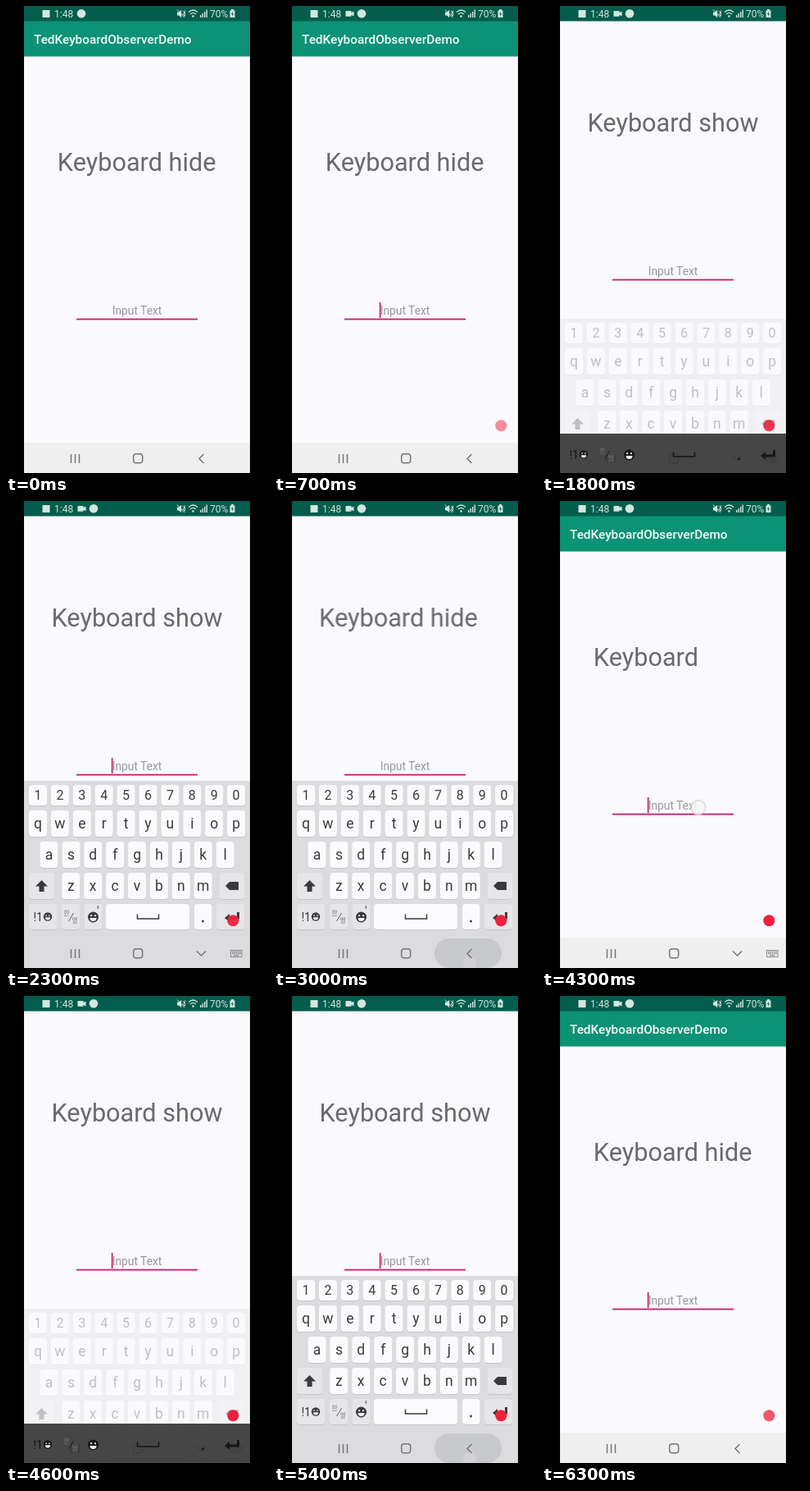
An HTML page that plays this animation: 320x569 px, repeating every 6400 ms.

```html
<!DOCTYPE html>
<html lang="en">
<head>
<meta charset="utf-8">
<title>Keyboard observer demo</title>
<style>
html, body { margin: 0; height: 100%; overflow: hidden; background: #000; }
svg { display: block; width: 100vw; height: 100vh; font-family: Roboto, sans-serif; }
.mid { text-anchor: middle; }
.line { fill: none; stroke: currentColor; }
.big { font-size: 30.67px; fill: #6b696d; white-space: pre; }
.status { color: #d3e6e0; fill: #d3e6e0; }
.nav { color: #757577; }
.keys { color: #3a3a3c; fill: #3a3a3c; }

/* One step is 100 ms, 1.5625% of the loop. */
.a { animation: 6400ms step-end infinite; }
#page { animation-name: pan; }
#hide { animation-name: hide; }
#hideWord { animation-name: word; }
#show { animation-name: show; }
#caret { animation-name: caret; }
#board { animation-name: board; }
#scrim { animation-name: scrim; }
#back { animation-name: back; }
#ime { animation-name: ime; }
#ripple { animation-name: ripple; }
#tapField { animation-name: tapField; }
#tapBack { animation-name: tapBack; }
#camera { animation-name: camera; }
#badge { animation-name: badge; }
#dot { animation-name: dot; animation-timing-function: linear; }

@keyframes pan {
  0%, 53.12%, 92.18%, 100% { transform: translateY(0); }
  24.99%, 68.74% { transform: translateY(-16px); }
  26.56%, 70.31% { transform: translateY(-40px); }
  28.12%, 71.87% { transform: translateY(-48px); }
  49.99%, 89.06% { transform: translateY(-30px); }
  51.56%, 90.62% { transform: translateY(-8px); }
}
@keyframes hide {
  0%, 48.43%, 87.49%, 100% { opacity: 1; transform: translateX(0); }
  24.99%, 68.74% { opacity: 0; transform: translateX(0); }
  46.87%, 85.93% { opacity: 1; transform: translateX(-7.7px); }
}
@keyframes word {
  0%, 24.99%, 68.74%, 100% { visibility: visible; }
  23.43%, 67.18% { visibility: hidden; }
}
@keyframes show {
  0%, 46.87%, 85.93%, 100% { opacity: 0; }
  24.99%, 68.74% { opacity: 1; }
}
@keyframes caret {
  0%, 12.49%, 28.12%, 43.74%, 59.37%, 74.99%, 90.62% { opacity: 0; }
  4.68%, 20.31%, 35.93%, 51.56%, 67.18%, 82.81%, 98.43%, 100% { opacity: 1; }
}
@keyframes board {
  0%, 49.99%, 89.06%, 100% { opacity: 0; transform: translateY(70px); }
  26.56%, 70.31% { opacity: .08; transform: translateY(62px); }
  28.12%, 71.87% { opacity: .3; transform: translateY(40px); }
  29.68%, 73.43% { opacity: .8; transform: translateY(10px); }
  31.24%, 74.99% { opacity: 1; transform: translateY(0); }
  48.43%, 87.49% { opacity: .4; transform: translateY(32px); }
}
@keyframes scrim {
  0%, 29.68%, 73.43%, 100% { opacity: 0; }
  26.56%, 70.31% { opacity: 1; }
}
@keyframes back {
  0%, 43.74%, 82.81%, 100% { opacity: 1; }
  23.43%, 67.18% { opacity: 0; }
}
@keyframes ime {
  0%, 43.74%, 82.81%, 100% { opacity: 0; }
  23.43%, 67.18% { opacity: 1; }
}
@keyframes ripple {
  0%, 49.99%, 89.06%, 100% { opacity: 0; }
  43.74%, 82.81% { opacity: .6; }
  45.31%, 84.37% { opacity: 1; }
  48.43%, 87.49% { opacity: .5; }
}
@keyframes tapField {
  0%, 26.56%, 70.31%, 100% { opacity: 0; }
  21.87%, 67.18% { opacity: 1; }
  24.99%, 68.74% { opacity: .5; }
}
@keyframes tapBack {
  0%, 48.43%, 87.49%, 100% { opacity: 0; }
  43.74%, 82.81% { opacity: 1; }
}
@keyframes camera { 0% { opacity: 0; } 3.12%, 100% { opacity: 1; } }
@keyframes badge { 0% { transform: translateX(-15px); } 3.12%, 100% { transform: none; } }
@keyframes dot {
  0%, 3.12% { opacity: 0; }
  10.93% { opacity: .5; }
  28.12% { opacity: .88; }
  46.87%, 85% { opacity: 1; }
  98.43%, 100% { opacity: .75; }
}
</style>
</head>
<body>
<svg viewBox="0 0 320 569">
  <defs>
    <clipPath id="screen"><rect x="22" width="276" height="569"/></clipPath>
    <g id="smile">
      <circle r="6.5"/>
      <g fill="#f5f5f7">
        <circle cx="-2.4" cy="-1.8" r="1.1"/><circle cx="2.4" cy="-1.8" r="1.1"/>
        <path d="M-4 1H4A4 4 0 0 1-4 1"/>
      </g>
    </g>
    <g id="lowRow">
      <text x="33.5" y="511.5" font-size="14">!1</text>
      <use href="#smile" transform="translate(51 506.5) scale(.8)"/>
      <g class="mid" font-family="Noto Sans CJK KR, Noto Sans CJK, sans-serif" font-size="8" fill="#77777a">
        <text x="74" y="505">한</text><text x="84" y="514">영</text>
      </g>
      <path class="line" stroke="#77777a" stroke-width=".8" d="M76.500 512l6-10"/>
      <use href="#smile" transform="translate(106.500 507)"/>
      <path class="line" stroke-width="1.5" d="M160.500 503.500v5.500h26v-5.500"/>
      <circle cx="240.500" cy="512" r="1.400"/>
      <path d="M267 508l6-5v3.500h9V501h3v8.500H273v3.500z"/>
    </g>
  </defs>

  <rect width="320" height="569"/>
  <g clip-path="url(#screen)">
    <rect x="22" width="276" height="569" fill="#faf9fc"/>

    <g id="page" class="a">
      <rect x="22" y="18" width="276" height="43.500" fill="#0c9275"/>
      <text x="34" y="46" font-size="15.33" font-weight="500" fill="#f4fbf9">TedKeyboardObserverDemo</text>
      <text id="hide" class="a big" x="62.800" y="200.500">Keyboard <tspan id="hideWord" class="a">hide</tspan></text>
      <text id="show" class="a big mid" x="160" y="200.500">Keyboard show</text>
      <text class="mid" x="160" y="376" font-size="13.8" fill="#98969a">Input Text</text>
      <rect id="caret" class="a" x="128.800" y="361" width="1.700" height="19" fill="#b5265f"/>
      <rect x="86" y="380.700" width="148" height="1.800" fill="#d2186d"/>
    </g>

    <rect x="22" width="276" height="18.500" fill="#045d4c"/>
    <g class="status">
      <rect x="44.500" y="5" width="9" height="9"/>
      <text x="59" y="13.700" font-size="12">1:48</text>
      <path id="camera" class="a" d="M87.500 6h7v2l3-1.600v6L94.500 10.800v2h-7z"/>
      <circle id="badge" class="a" cx="107" cy="9.300" r="5.300"/>
      <path d="M209 7.500h2.200l3-2.800v9.600l-3-2.800H209z"/>
      <path class="line" d="M209 4.500l9 9.500M216 6l2 2-2 2 2 2M218.500 5.500v7"/>
      <path class="line" stroke-width="1.200" d="M223 7.500q5.500-5 11 0M225 10q3.500-3.200 7 0"/>
      <circle cx="228.500" cy="12.500" r="1.300"/>
      <path d="M237 11h1.400v3H237zM239.500 9h1.400v5h-1.400zM242 7h1.400v7H242zM244.500 4.500h1.400V14h-1.400z"/>
      <text x="249" y="13.700" font-size="12">70%</text>
      <path d="M273.500 5.500h1.500V4h3v1.500h1.500V14h-6z"/>
      <path d="M277 6.500l-2 3.500h1.500l-.5 3 2.200-3.800h-1.500z" fill="#045d4c"/>
    </g>

    <rect x="22" y="532" width="276" height="37" fill="#efeff0"/>
    <g id="board" class="a">
      <rect x="22" y="341" width="276" height="228" fill="#dcdcde"/>
      <g id="caps"></g>
      <g class="keys">
        <g id="letters" class="mid"></g>
        <path d="M43.500 462l7.500 7.500h-4.500v6.500h-6v-6.500H36z"/>
        <path d="M268 469l5-5h11v10h-11z"/>
        <path class="line" stroke="#fff" stroke-width="1.200" d="M275 466.500l5 5m0-5l-5 5"/>
        <use href="#lowRow"/>
        <rect x="111.300" y="493" width="2" height="4" rx="1" fill="#8a8a8c"/>
      </g>
    </g>

    <rect id="ripple" class="a" x="196" y="533" width="82" height="36" rx="18" fill="#c8c9cb"/>
    <circle id="tapBack" class="a" cx="239" cy="563" r="8" fill="#d4d5d7" fill-opacity=".8"/>
    <g class="nav">
      <path class="line" stroke-width="1.500" d="M79.500 546v11M84.500 546v11M89.500 546v11"/>
      <rect class="line" x="155.700" y="545.700" width="11" height="11" rx="3.300" stroke-width="1.500"/>
      <path id="back" class="a line" stroke-width="1.500" d="M241.500 546l-5.500 5.500 5.500 5.500"/>
      <g id="ime" class="a">
        <path class="line" stroke-width="1.500" d="M233 548.500l5.500 5.500 5.500-5.500"/>
        <rect class="line" x="274.500" y="547.500" width="13.500" height="8" stroke-width=".8"/>
        <path class="line" stroke-width="1.300" stroke-dasharray="1.300 1" d="M276 549.500h11M276 551.500h11"/>
        <path class="line" d="M278 553.800h6.500"/>
      </g>
    </g>

    <g id="scrim" class="a">
      <rect x="22" y="521" width="276" height="48" fill="#383838" fill-opacity=".92"/>
      <use href="#lowRow" y="40" color="#161616" fill="#161616"/>
    </g>

    <g id="tapField" class="a">
      <circle cx="191" cy="373.500" r="9" fill="#ececee" fill-opacity=".8" stroke="#cfcfd2"/>
      <circle cx="191" cy="373.500" r="7" fill="#fff" fill-opacity=".5"/>
    </g>
    <circle id="dot" class="a" cx="277.300" cy="511.300" r="7" fill="#f0203c"/>
  </g>
</svg>
<script>
const NS = 'http://www.w3.org/2000/svg';
const caps = document.getElementById('caps');
const letters = document.getElementById('letters');

function add(parent, tag, attrs, text = '') {
  const el = document.createElementNS(NS, tag);
  for (const name in attrs) el.setAttribute(name, attrs[name]);
  el.textContent = text;
  parent.append(el);
}

function cap(x, y, width, height, fill = '#fbfbfd') {
  add(caps, 'rect', { x, y: y + 1, width, height, rx: 4, fill: '#c6c6c9' });
  add(caps, 'rect', { x, y, width, height, rx: 4, fill });
}

function row(chars, first, y, height, size) {
  [...chars].forEach((char, i) => {
    const x = first + i * 26.9;
    cap(x - 11, y, 22, height);
    add(letters, 'text', { x, y: y + height / 2 + size * .33, 'font-size': size }, char);
  });
}

row('1234567890', 39, 346, 25, 16);
row('qwertyuiop', 39, 377, 32, 17.5);
row('asdfghjkl', 52.5, 415, 32, 17.5);
row('zxcvbnm', 79.3, 453, 32, 17.5);

const soft = '#e6e6e8';
cap(28, 453, 31, 32, soft);
cap(261, 453, 30, 32, soft);
cap(28, 491, 34, 31, soft);
cap(68, 491, 22, 31, soft);
cap(95.5, 491, 22, 31, soft);
cap(122, 491, 102, 31);
cap(230, 491, 21.5, 31);
cap(257, 491, 34, 31, soft);
</script>
</body>
</html>
```
